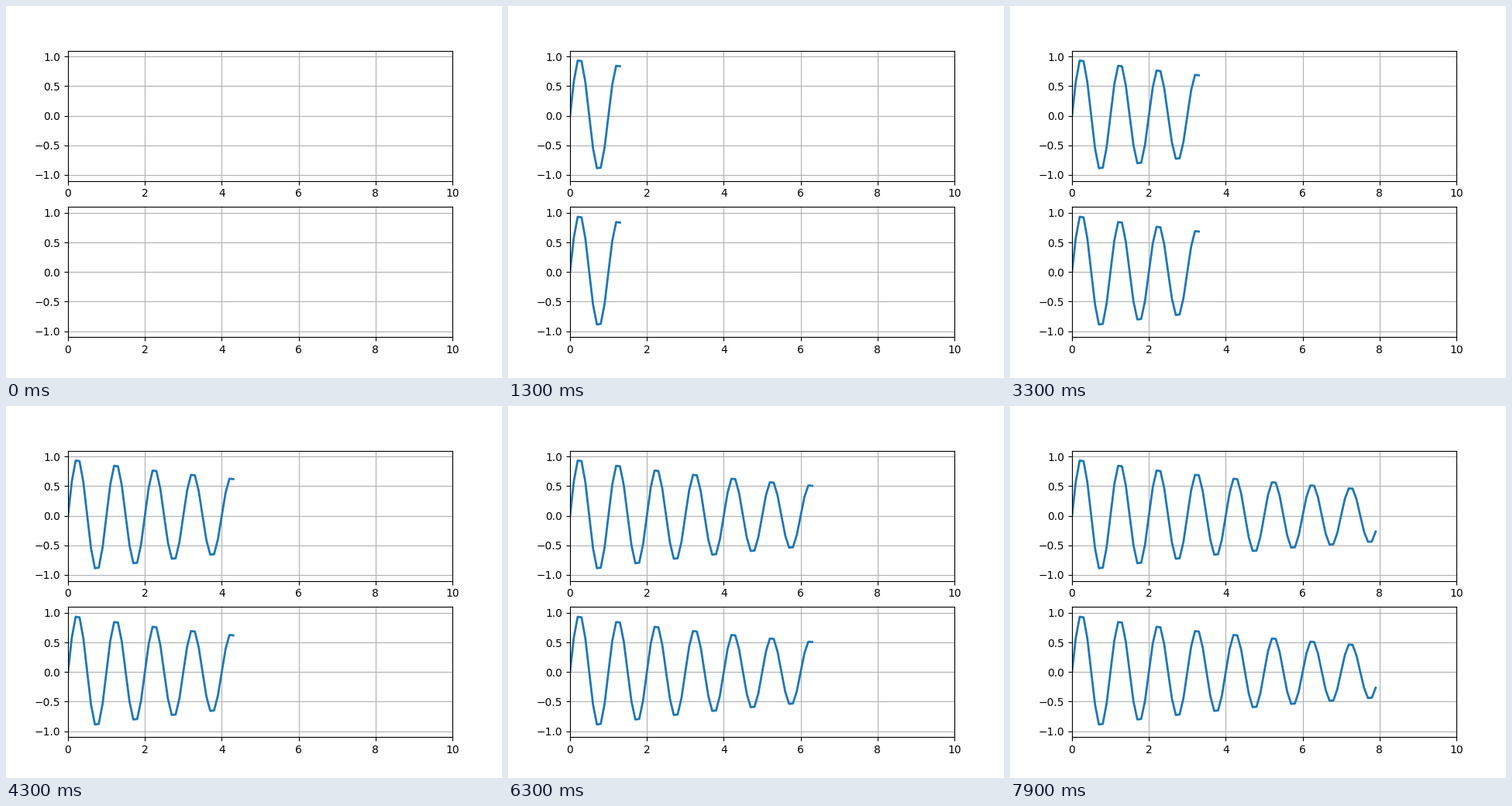
Recreate the animation shown at these times as a matplotlib script. Size 640x480 px, loop 8 s.

```python
import numpy as np
import matplotlib.pyplot as plt
from matplotlib.animation import FuncAnimation

FRAMES = 80
INTERVAL = 100  # ms
STEP = 0.1      # time units per frame

t = np.arange(FRAMES) * STEP
y = np.sin(2 * np.pi * t) * np.exp(-t / 10)

fig, axes = plt.subplots(2, 1, figsize=(6.4, 4.8), dpi=100)
lines = []
for ax in axes:
    ax.set_xlim(0, 10)
    ax.set_ylim(-1.1, 1.1)
    ax.grid()
    line, = ax.plot([], [], lw=2, color="tab:blue")
    lines.append(line)


def init():
    for line in lines:
        line.set_data([], [])
    return lines


def update(i):
    for line in lines:
        line.set_data(t[:i + 1], y[:i + 1])
    return lines


anim = FuncAnimation(fig, update, frames=FRAMES, init_func=init,
                     interval=INTERVAL, repeat=True, repeat_delay=0)
plt.show()
```
